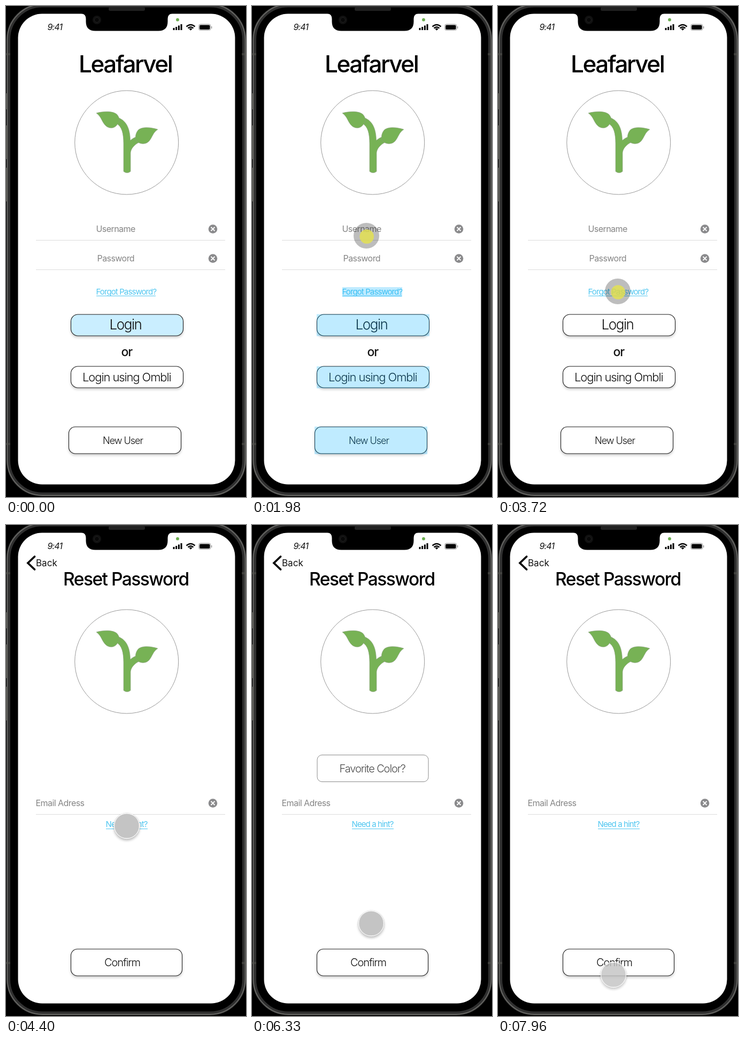
An HTML page for the animation above (8 s loop, 449 px wide and 917 px high).

```html
<!DOCTYPE html>
<html lang="en">
<head>
<meta charset="utf-8">
<title>Login prototype</title>
<style>
  html, body { margin: 0; width: 100%; height: 100%; overflow: hidden; background: #000; }
  svg { display: block; width: 100vw; height: 100vh; }
  text { font-family: Inter, Roboto, sans-serif; letter-spacing: -.055em; fill: #111; }
  .title { font-weight: 500; fill: #000; }
  .label { font-size: 16px; letter-spacing: -.035em; fill: #858585; }
  .link { font-size: 15px; letter-spacing: -.06em; fill: #4fc6f0; }
  .light { font-weight: 300; }
  .rule { stroke: #dcdcdc; }
  .button { fill: #fff; stroke: #1c1c1c; stroke-width: 1.1; filter: drop-shadow(0 3px 2px rgba(0, 0, 0, .18)); }
  .flash rect { fill: #00afff; fill-opacity: .25; }

  .anim { animation: 8s linear infinite; }
  .reset { animation-name: reset; animation-timing-function: step-end; }
  .home { animation-name: home; animation-timing-function: step-end; }
  .fill { animation-name: hover; animation-timing-function: step-end; }
  .flash { animation-name: flash; }
  .hint { animation-name: hint; }
  .cursor { animation-name: move; }
  .seen { animation-name: seen; animation-timing-function: step-end; }
  .up { animation-name: up; }
  .down { animation-name: down; }

  @keyframes home { 0% { visibility: visible } 47.375%, 100% { visibility: hidden } }
  @keyframes reset { 0% { visibility: hidden } 47.375%, 100% { visibility: visible } }
  @keyframes hover { 0% { fill: #caeeff } 21.5%, 100% { fill: #fff } }
  @keyframes flash {
    0%, 22.4% { opacity: 0 }
    23.6%, 30% { opacity: 1 }
    33%, 100% { opacity: 0 }
  }
  @keyframes hint {
    0%, 58% { opacity: 0 }
    61%, 97% { opacity: 1 }
    98.2%, 100% { opacity: 0 }
  }
  @keyframes seen { 0% { visibility: hidden } .875%, 100% { visibility: visible } }
  @keyframes move {
    0%, .875% { transform: translate(385px, 935px) }
    3.75% { transform: translate(250px, 766px) }
    7% { transform: translate(219px, 680px) }
    10.875% { transform: translate(206px, 536px) }
    13.5% { transform: translate(208px, 445px) }
    18.125% { transform: translate(309px, 422px) }
    22.25%, 27.5% { transform: translate(214px, 429px) }
    31.6% { transform: translate(220px, 524px) }
    42.25%, 49.75% { transform: translate(224px, 533px) }
    55%, 58.75% { transform: translate(226px, 562px) }
    63.5% { transform: translate(206px, 597px) }
    68.75% { transform: translate(212px, 648px) }
    72.5% { transform: translate(290px, 584px) }
    76.25% { transform: translate(245px, 660px) }
    79.125% { transform: translate(223px, 744px) }
    90.75% { transform: translate(216px, 800px) }
    96.25% { transform: translate(216px, 850px) }
    99.5%, 100% { transform: translate(216px, 840px) }
  }
  @keyframes up {
    0%, 22% { opacity: 1 }
    23%, 27% { opacity: 0 }
    28.5%, 44% { opacity: 1 }
    45%, 49.75% { opacity: 0 }
    51%, 56% { opacity: 1 }
    57%, 59% { opacity: 0 }
    60.5%, 95.2% { opacity: 1 }
    96.2%, 98% { opacity: 0 }
    99.5%, 100% { opacity: .82 }
  }
  @keyframes down {
    0%, 22% { opacity: 0 }
    23%, 27% { opacity: 1 }
    28.5%, 44% { opacity: 0 }
    45%, 49.75% { opacity: 1 }
    51%, 56% { opacity: 0 }
    57%, 59% { opacity: 1 }
    60.5%, 95.2% { opacity: 0 }
    96.2%, 98% { opacity: 1 }
    99.5%, 100% { opacity: 0 }
  }
</style>
</head>
<body>
<svg viewBox="0 0 449 917" preserveAspectRatio="none">
  <defs>
    <g id="clear">
      <circle r="8.3" fill="#8a8a8c"/>
      <path d="M-3 -3L3 3M3 -3L-3 3" stroke="#fff" stroke-width="1.8" stroke-linecap="round"/>
    </g>
    <g id="sprout">
      <circle cx="225.7" cy="255" r="97" fill="none" stroke="#999"/>
      <g fill="#77b255" stroke="#8a9a82" stroke-width=".6">
        <path d="M220 309V258C220 238 217 225 206 219L211 209C226 215 232 230 232.5 251Q237 247 244 244L250 254C240 259 234 266 233 274V309Q226.5 314 220 309Z"/>
        <path d="M169 200C183 196 202 196 208 203C213 209 213 215 209 220C204 229 194 230 187 224C179 217 179 207 169 200Z"/>
        <path d="M284 230.5C270 226 254 225 247 232C242 238 241 247 244 252C251 259 262 259 268 252C274 245 275 236 284 230.5Z"/>
      </g>
    </g>
  </defs>

  <!-- Phone body -->
  <rect width="449" height="917" fill="#000"/>
  <rect x="4.5" y="-1" width="441" height="913" rx="63" fill="#000" stroke="#303030" stroke-width="7"/>
  <rect x="2.5" y="-3" width="445" height="917" rx="66" fill="none" stroke="#686865" stroke-width="1.8"/>
  <path d="M0 90H8M441 90H449M0 818H8M441 818H449" stroke="#55554f" stroke-width="4" opacity=".5"/>
  <path d="M.7 163V193M.7 223V286M.7 302V365" stroke="#5a5a56" stroke-width="1.6"/>
  <rect x="192" y="2" width="68" height="7" rx="3" fill="#222"/>
  <rect x="22.5" y="14.5" width="406" height="879" rx="45" fill="#fff"/>
  <path d="M141 14Q149.500 15 149.500 24V29Q149.500 46.500 167 46.500H285Q302.500 46.500 302.500 29V24Q302.500 15 311 14Z"/>
  <circle cx="170" cy="26" r="8" fill="#111"/>
  <circle cx="170" cy="26" r="4.5" fill="#080808" stroke="#202020"/>

  <!-- Status bar -->
  <text x="77.5" y="45" font-size="16" font-style="italic">9:41</text>
  <circle cx="321" cy="25.7" r="2.9" fill="#6cae50"/>
  <path d="M314 45V41M318.700 45V39M323.400 45V36.500M328 45V34" stroke="#000" stroke-width="3"/>
  <g fill="none" stroke="#000" stroke-width="2.4">
    <path d="M337.500 38.500Q345.500 31.500 353.500 38.500M340.500 41.500Q345.500 37 350.500 41.500"/>
    <path d="M342.500 42.700Q345.500 40.500 348.500 42.700L345.500 45.700Z" fill="#000" stroke="none"/>
  </g>
  <rect x="360.5" y="34" width="22.5" height="11.5" rx="3.5" fill="none" stroke="#999"/>
  <rect x="362" y="35.5" width="19.5" height="8.5" rx="2"/>
  <path d="M384.700 38V42" stroke="#aaa" stroke-width="1.5"/>

  <use href="#sprout"/>

  <g class="anim home">
    <text class="title" x="136" y="124" font-size="44">Leafarvel</text>
    <text class="label" x="168.5" y="422">Username</text>
    <text class="label" x="170.5" y="477">Password</text>
    <path class="rule" d="M56 437.500H410M56 492.500H410"/>
    <use href="#clear" x="387" y="416.5"/>
    <use href="#clear" x="387" y="471.5"/>
    <text class="link" x="168.5" y="539">Forgot Password?</text>
    <path d="M169 541.500H280" stroke="#4fc6f0"/>
    <rect class="button anim fill" x="121.5" y="576" width="210" height="40" rx="13"/>
    <text class="light" x="193.5" y="604" font-size="26">Login</text>
    <text x="215.5" y="653.5" font-size="23" font-weight="500">or</text>
    <rect class="button" x="121.5" y="673" width="210" height="40" rx="13"/>
    <text class="light" x="143" y="701" font-size="22" style="letter-spacing:-.05em">Login using Ombli</text>
    <rect class="button" x="117.5" y="786" width="210" height="50" rx="12"/>
    <text class="light" x="181" y="818" font-size="18">New User</text>
    <g class="anim flash">
      <rect x="169" y="525" width="112" height="18"/>
      <rect x="121" y="575.5" width="211" height="41"/>
      <rect x="121" y="673" width="211" height="41"/>
      <rect x="117" y="785.5" width="211" height="51.5"/>
    </g>
  </g>

  <g class="anim reset">
    <path d="M53.500 59L41 71L53.500 83" fill="none" stroke="#000" stroke-width="3.8" stroke-linecap="round"/>
    <text x="56" y="77" font-size="17" style="letter-spacing:0">Back</text>
    <text class="title" x="107" y="112.5" font-size="33.5" style="letter-spacing:-.045em">Reset Password</text>
    <text class="label" x="55.5" y="525">Email Adress</text>
    <path class="rule" d="M56 540.500H410"/>
    <use href="#clear" x="387" y="519.5"/>
    <text class="link" x="186.5" y="564">Need a hint?</text>
    <path d="M187 567.500H265" stroke="#4fc6f0"/>
    <rect class="button" x="121.5" y="792" width="208" height="50" rx="12"/>
    <text class="light" x="184" y="824" font-size="20">Confirm</text>
    <g class="anim hint">
      <rect x="122" y="429.5" width="208" height="50" rx="9" fill="#fff" stroke="#8a8a8a"/>
      <text class="light" x="163.5" y="462" font-size="20" style="fill:#4a4a4a">Favorite Color?</text>
    </g>
  </g>

  <!-- Touch pointer -->
  <g class="anim seen">
    <g class="anim cursor">
      <g class="anim up">
        <circle r="24" fill="#c4c4c4" stroke="#aaa" stroke-width=".8" style="filter:drop-shadow(0 3px 2px rgba(0,0,0,.25))"/>
        <circle r="23.5" fill="none" stroke="#fff" stroke-width="1.3"/>
      </g>
      <g class="anim down">
        <circle r="24" fill="#000" fill-opacity=".26"/>
        <circle cx=".7" cy="1.5" r="13.3" fill="#e4e24e" fill-opacity=".82"/>
      </g>
    </g>
  </g>
</svg>
</body>
</html>
```
